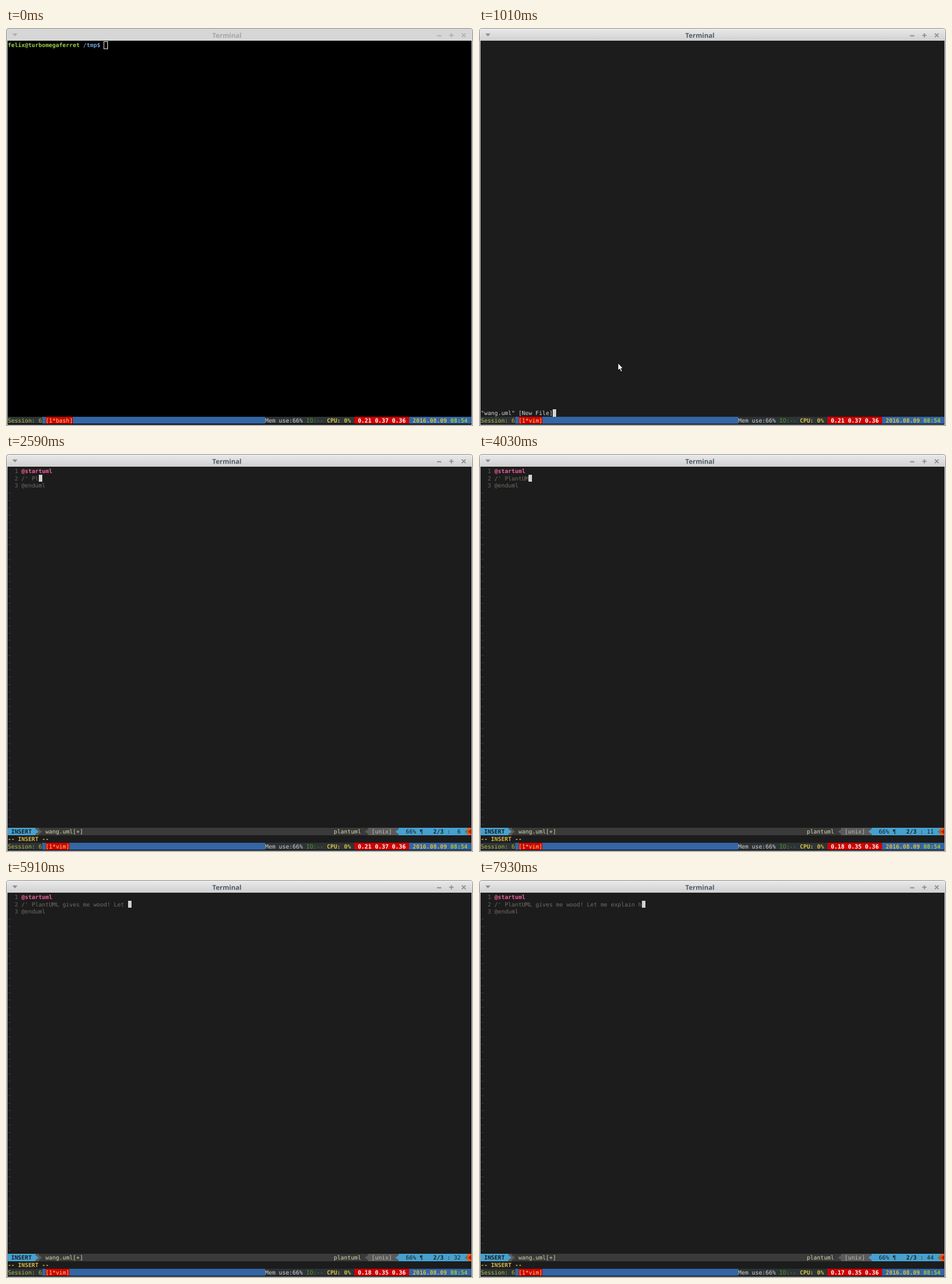
These frames come from a looping animation (811x690 px, 8000 ms). An HTML page:

```html
<!DOCTYPE html>
<html lang="en">
<head>
<meta charset="utf-8">
<title>Terminal</title>
<style>
  html, body { margin: 0; width: 100%; height: 100%; overflow: hidden; background: #fff; }
  svg { display: block; width: 811px; height: 690px; }
  text { white-space: pre; text-rendering: geometricPrecision; }
  .cells text { font: 9.9px "DejaVu Sans Mono", monospace; }
  .cells text.b { font-weight: bold; }
  #title { font: bold 11.5px "Noto Sans", "Open Sans", sans-serif; }
</style>
</head>
<body>
<svg viewBox="0 0 811 690">
  <defs>
    <linearGradient id="bar" x1="0" y1="0" x2="0" y2="1">
      <stop offset="0" stop-color="#eaeaea"/>
      <stop offset="1" stop-color="#d0d0d0"/>
    </linearGradient>
  </defs>
  <path d="M.5 689.5V5.5q0-5 5-5h800q5 0 5 5v684z" fill="#d6d6d6" stroke="#8c8c8c"/>
  <path id="active" d="M1 22V5.500q0-4.500 4.500-4.500h800q4.500 0 4.500 4.500V22z" fill="url(#bar)"/>
  <path d="M1.500 22V688.500H809.500V22" fill="none" stroke="#e6e6e6"/>
  <text id="title" x="383.700" y="16.800" text-anchor="middle">Terminal</text>
  <g id="buttons">
    <path d="M11 9.500h9l-4.500 5z"/>
    <path d="M748.500 13.500h7.500M769.700 12.700h7.600M773.500 8.900v7.600M791.600 9.300l6.600 6.600M798.200 9.300l-6.600 6.600" fill="none" stroke-width="1.800"/>
  </g>
  <rect id="screen" x="2.500" y="22" width="806" height="666"/>
  <g id="cells" class="cells"></g>
  <path id="pointer" d="M0 0V12.500L2.900 9.900L5 14.700L7.200 13.700L5.100 9.100H8.800Z" fill="#fff" stroke="#000" stroke-width=".8"/>
</svg>
<script>
const LOOP = 8000, CW = 5.96, RH = 12.76, LEFT = 3, TOP = 22.9;
const FOCUS = 120, RECALL = 570, ENTER = 820, LAUNCH = 930, OPEN = 1010, READY = 1120, INSERT = 1440, COMMENT = 2110;
const USER = 'felix@turbomegaferret';
const BLUE = '#3465a4', SKY = '#46a1cf', GREY = '#5a5a5a', DARK = '#2e3436', INK = '#1c1c1c',
      MID = '#3a3a3a', CREAM = '#d7d7af', PINK = '#f0609a', NOTE = '#716c64', PALE = '#d3d3d3';

// Keystroke bursts: first key, last key, keys ("\b" deletes).
const BURSTS = [
  [1670, 1670, '/'], [COMMENT, COMMENT, "'"], [2400, 2400, ' P'], [2590, 2590, 'l'],
  [2900, 2990, 'an'], [3130, 3300, 'tU'], [3550, 3550, 'm'], [3890, 3890, '\b'],
  [4030, 4190, 'ML'], [4330, 5120, ' gives me woo'], [5200, 5320, 'd!'], [5480, 5520, ' L'],
  [5710, 6230, 'et me e'], [6400, 6400, 'x'], [6560, 6560, 'p'], [7110, 7110, 'l'],
  [7260, 7510, 'ain'], [7860, 7930, ' h']
];
const CURSOR_OFF = [[1970, 2110], [7010, 7110]];

const el = id => document.getElementById(id);
const cx = col => LEFT + col * CW;
const cy = row => TOP + row * RH;
const escape = s => s.replace(/&/g, '&amp;').replace(/</g, '&lt;');

function text(row, col, str, fill, bold) {
  return `<text x="${cx(col).toFixed(2)}" y="${(cy(row) + 9.9).toFixed(2)}" fill="${fill}"${bold ? ' class="b"' : ''}>${escape(str)}</text>`;
}

function block(row, col, cols, fill) {
  const x = Math.round(cx(col)), y = Math.round(cy(row));
  const w = Math.round(cx(col + cols)) - x, h = Math.round(cy(row + 1)) - y;
  return `<rect x="${x}" y="${y}" width="${w}" height="${h}" fill="${fill}"/>`;
}

// Separator triangle filling one cell, dir 1 points right and -1 left.
function wedge(row, col, dir, fill) {
  const from = Math.round(cx(dir > 0 ? col : col + 1)), y = cy(row);
  return `<path d="M${from} ${y + 2.2}l${dir * 5.8} 4.300l${-dir * 5.8} 4.300z" fill="${fill}"/>`;
}

function typed(t) {
  let out = '';
  for (const [a, b, keys] of BURSTS) {
    [...keys].forEach((key, i) => {
      const at = a + (b - a) * i / Math.max(1, keys.length - 1);
      if (t + 0.01 >= at) out = key === '\b' ? out.slice(0, -1) : out + key;
    });
  }
  return out;
}

function sessionBar(t) {
  const tab = t < LAUNCH ? '[1*bash]' : '[1*vim]';
  const load = t < 3210 ? '0.21 0.37' : t < 7380 ? '0.18 0.35' : '0.17 0.35';
  const r = 51;
  return block(r, 0, 135, BLUE) + block(r, 0, 10, DARK) + text(r, 0, 'Session: 6', '#b5b840') +
    block(r, 11, tab.length, '#d00000') + text(r, 11, tab, '#f2dc78') +
    block(r, 75, 26, DARK) + text(r, 75, 'Mem use:66%', PALE) + text(r, 87, 'IO:--', '#4e9a26') +
    text(r, 93, 'CPU: 0%', '#d8c040', true) +
    block(r, 101, 16, '#d00000') + text(r, 102, load + ' 0.36', '#fff', true) +
    text(r, 118, '2016.08.09', '#d8c040', true) + text(r, 129, '08:54', '#a6c83c', true);
}

function shell(t) {
  let out = text(0, 0, USER, '#9ad048', true) + text(0, 22, '/tmp$', '#6fa3d4', true);
  if (t >= RECALL) out += text(0, 28, 'vim wang.uml', '#f0f0f0');
  if (t < FOCUS) {
    out += '<rect x="170" y="23.500" width="6.500" height="12.500" fill="none" stroke="#fff"/>';
  } else {
    out += t >= ENTER ? block(1, 0, 1, '#eee') : block(0, t < RECALL ? 28 : 40, 1, '#eee');
  }
  return out;
}

function statusLine(t, count) {
  const r = 49;
  return block(r, 0, 135, MID) +
    block(r, 0, 8, SKY) + text(r, 1, t < INSERT ? 'NORMAL' : 'INSERT', INK, true) +
    block(r, 8, 1, GREY) + wedge(r, 8, 1, SKY) + wedge(r, 9, 1, GREY) +
    text(r, 11, 'wang.uml[+]', CREAM) + text(r, 95, 'plantuml', CREAM) +
    wedge(r, 104, -1, GREY) + block(r, 105, 9, GREY) + text(r, 106, '[unix]', '#bdbdb0') +
    wedge(r, 113, -1, SKY) + block(r, 114, 20, SKY) +
    text(r, 116, '66% ¶', INK) + text(r, 124, '2/3', INK, true) +
    text(r, 128, ':' + String(count + 1).padStart(3), INK) +
    wedge(r, 133, -1, '#8a6a3c') + block(r, 134, 1, '#f05a1c') + wedge(r, 134, -1, '#b81c00');
}

function editor(t) {
  const line = typed(t), open = t >= COMMENT;
  const hidden = CURSOR_OFF.some(([a, b]) => t >= a && t < b);
  let out = '';
  for (let r = 0; r < 3; r++) out += text(r, 2, String(r + 1), '#66625c');
  for (let r = 3; r < 49; r++) out += text(r, 0, '~', '#404040');
  out += text(0, 4, '@startuml', PINK, true) + text(1, 4, line, open ? NOTE : PALE) +
    text(2, 4, '@enduml', open ? NOTE : PINK, !open);
  if (!hidden) out += block(1, 4 + line.length, 1, PALE);
  out += statusLine(t, line.length);
  out += t < INSERT ? text(50, 0, '"wang.uml" [New File]', PALE) : text(50, 0, '-- INSERT --', '#d8b848', true);
  return out;
}

function opening() {
  return text(50, 0, '"wang.uml" [New File]', PALE) + block(50, 21, 1, PALE);
}

let shown = '';

function render(t) {
  const focused = t >= FOCUS;
  el('active').style.visibility = focused ? 'visible' : 'hidden';
  el('title').setAttribute('fill', focused ? '#4e5d66' : '#a6a6a6');
  const tone = focused ? '#8e8e8e' : '#b0b0b0';
  el('buttons').setAttribute('fill', tone);
  el('buttons').setAttribute('stroke', tone);
  el('buttons').firstElementChild.setAttribute('stroke', 'none');
  el('screen').setAttribute('fill', t < OPEN ? '#000' : INK);

  const body = t < OPEN ? shell(t) : t < READY ? opening() : editor(t);
  const cells = body + sessionBar(t);
  if (cells !== shown) el('cells').innerHTML = shown = cells;

  // The pointer glides in from the left edge and vanishes once typing starts.
  const p = Math.min(1, Math.max(0, (t - 40) / 340)), ease = 1 - (1 - p) ** 2;
  el('pointer').style.visibility = t >= 40 && t < INSERT ? 'visible' : 'hidden';
  el('pointer').setAttribute('transform', `translate(${1 + 240.4 * ease} ${594 - 13 * ease})`);
}

const start = performance.now();
function tick() {
  render((performance.now() - start) % LOOP);
  requestAnimationFrame(tick);
}
tick();
</script>
</body>
</html>
```
